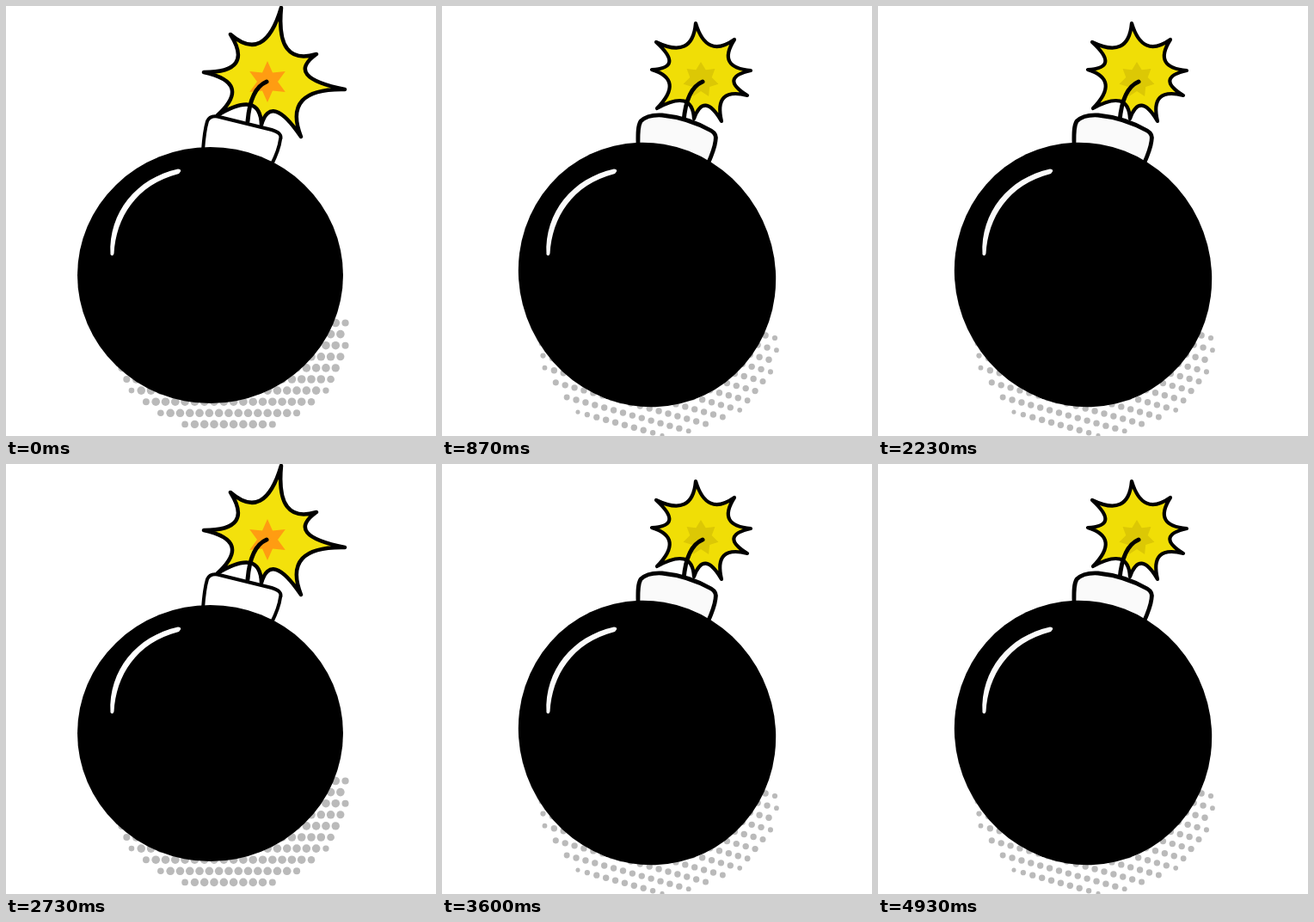
Recreate the animation shown at these times as an HTML page with a canvas. Size 500 px wide and 500 px high, loop 5.11 s.

```html
<!DOCTYPE html>
<html lang="en">
<head>
<meta charset="utf-8">
<title>Bomb</title>
<style>
  html, body { margin: 0; width: 100%; height: 100%; overflow: hidden; background: #fff; }
  canvas { display: block; width: 100vw; height: 100vh; }
</style>
</head>
<body>
<canvas id="stage" width="500" height="500"></canvas>
<script>
const ctx = document.getElementById('stage').getContext('2d');
const LOOP = 5110, GROUP = 1700;

const tall = {
  body: { x: 237.5, y: 313, rx: 154.5, ry: 149, turn: 0 },
  neck: 'M229 168 C230 154 231 144 234 134 Q237 127 246 128.5 L309 144 Q322 148 319 155 C318 163 314 174 309 184',
  neckLine: 4,
  white: '#fff',
  burst: {
    x: 304, y: 85, pull: 0.37, line: 4.5, fill: '#f3e10c',
    tips: [[320, 2], [361, 56], [394, 97], [343, 152], [297, 138], [246, 127], [230, 77], [261, 33]]
  },
  core: { x: 304, y: 88, points: 6, outer: 24, inner: 12, fill: '#ff9c12' },
  shade: { x: 260, y: 380, rx: 140, ry: 118, top: 366, dotX: 129, dotY: 434, turn: 0, size: 4.8 }
};

const small = {
  body: { x: 238.5, y: 312.5, rx: 155, ry: 148.5, turn: 1.13 },
  neck: 'M228 165 C228 152 227 141 231 134 Q239 126 256 127 C276 129 297 136 313 145 Q320 149 318 157 C317 165 313 175 309 184',
  neckLine: 4.8,
  white: '#fafafa',
  burst: {
    x: 302, y: 80, pull: 0.32, line: 4.2, fill: '#f0de06',
    tips: [[295, 20], [340, 39], [359, 75], [355, 104], [325, 134], [293, 131], [250, 119], [244, 74], [249, 42]]
  },
  core: { x: 301, y: 86, points: 7, outer: 21, inner: 13, fill: '#dcc805' },
  shade: { x: 252, y: 395, rx: 140, ry: 105, top: 381, dotX: 387, dotY: 386, turn: 0.27, size: 3.7 }
};

const HIGHLIGHT = new Path2D(
  'M200 189.5 C152 200 119 240 121.5 289 Q124 292 125.5 288 C128 246 151 208 201 195 Q206 190 200 189.5 Z');
const FUSE = new Path2D('M303 88 C289 94 283 110 281 134');

// Staggered halftone lattice inside an ellipse, dots shrinking at its rim.
function drawShade(s) {
  const cos = Math.cos(s.turn), sin = Math.sin(s.turn);
  ctx.fillStyle = '#bababa';
  for (let row = -40; row <= 40; row++) {
    for (let col = -60; col <= 60; col++) {
      const u = 11.3 * (col + row / 2), v = 13.1 * row;
      const x = s.dotX + u * cos - v * sin, y = s.dotY + u * sin + v * cos;
      const depth = 1 - Math.hypot((x - s.x) / s.rx, (y - s.y) / s.ry);
      if (depth < 0 || y < s.top) continue;
      ctx.beginPath();
      ctx.arc(x, y, s.size * Math.min(1, 0.65 + depth * 6), 0, 7);
      ctx.fill();
    }
  }
}

// Each hollow curve sags from the middle of two tips towards the centre.
function burstPath({ x, y, pull, tips }) {
  const path = new Path2D();
  path.moveTo(...tips[0]);
  tips.forEach(([ax, ay], i) => {
    const [bx, by] = tips[(i + 1) % tips.length];
    const mx = (ax + bx) / 2, my = (ay + by) / 2;
    path.quadraticCurveTo(mx + 2 * pull * (x - mx), my + 2 * pull * (y - my), bx, by);
  });
  path.closePath();
  return path;
}

function drawStar({ x, y, points, outer, inner, fill }) {
  ctx.fillStyle = fill;
  ctx.beginPath();
  for (let i = 0; i < points * 2; i++) {
    const r = i % 2 ? inner : outer, a = Math.PI * (i / points - 0.5);
    ctx.lineTo(x + r * Math.cos(a), y + r * Math.sin(a));
  }
  ctx.fill();
}

function fillAndStroke(path, fill, width) {
  ctx.fillStyle = fill;
  ctx.fill(path);
  ctx.lineWidth = width;
  ctx.stroke(path);
}

function draw({ body, neck, neckLine, white, burst, core, shade }) {
  ctx.fillStyle = '#fff';
  ctx.fillRect(0, 0, 500, 500);
  drawShade(shade);

  ctx.strokeStyle = '#000';
  ctx.lineJoin = ctx.lineCap = 'round';
  fillAndStroke(burstPath(burst), burst.fill, burst.line);
  drawStar(core);
  ctx.lineWidth = 5;
  ctx.stroke(FUSE);
  fillAndStroke(new Path2D(neck), white, neckLine);

  ctx.fillStyle = '#000';
  ctx.beginPath();
  ctx.ellipse(body.x, body.y, body.rx, body.ry, body.turn, 0, 7);
  ctx.fill();
  ctx.fillStyle = white;
  ctx.fill(HIGHLIGHT);
}

// Each group holds ten poses; its first one stays 200 ms, the others a sixth of a second.
function poseAt(t) {
  const u = t - GROUP * Math.min(2, Math.floor(t / GROUP));
  let step = 0;
  while (step < 9 && u >= 10 * Math.round(20 + step * 50 / 3)) step++;
  return step % 2 ? small : tall;
}

const start = performance.now();
function tick() {
  draw(poseAt((performance.now() - start) % LOOP));
  requestAnimationFrame(tick);
}
tick();
</script>
</body>
</html>
```
